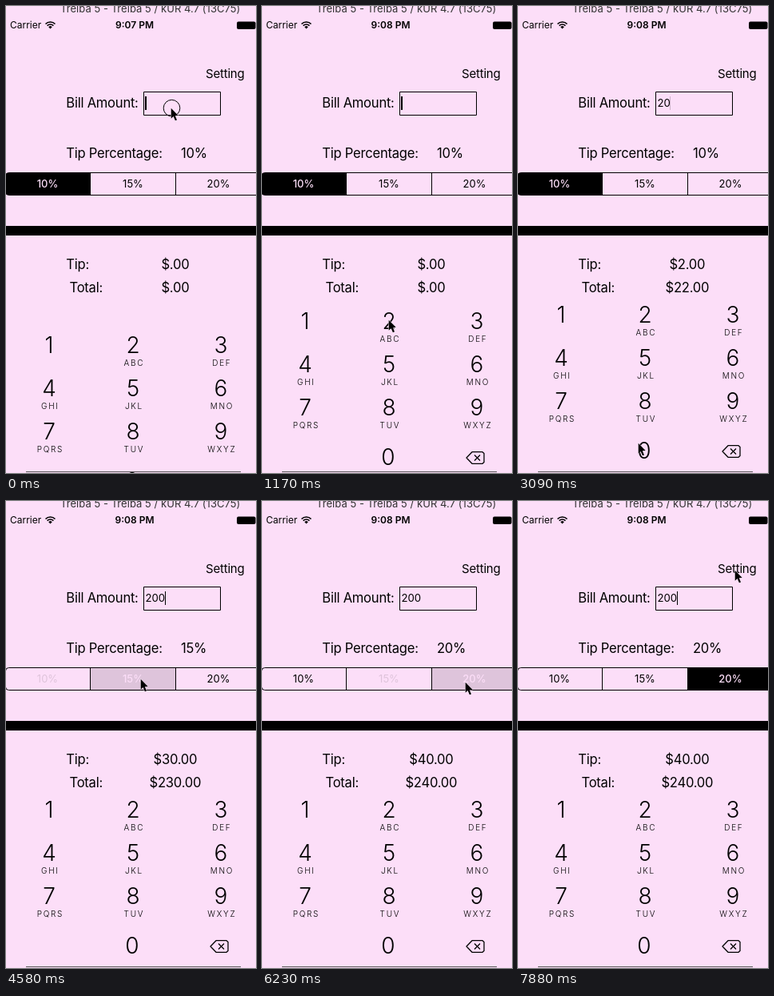
These frames come from a looping animation (313 px wide and 584 px high, 8 s). An HTML page with a canvas:

```html
<!DOCTYPE html>
<html lang="en">
<head>
<meta charset="utf-8">
<title>Tip calculator</title>
<style>
html, body { margin: 0; width: 100%; height: 100%; overflow: hidden; background: #fcdef8; }
canvas { display: block; width: 313px; height: 584px; }
</style>
</head>
<body>
<canvas id="stage"></canvas>
<script>
const W = 313, H = 584, LOOP = 8000;
const BG = '#fcdef8', INK = '#000';
const canvas = document.getElementById('stage');
const ctx = canvas.getContext('2d');
const dpr = window.devicePixelRatio || 1;
canvas.width = W * dpr;
canvas.height = H * dpr;

const clamp = v => Math.max(0, Math.min(1, v));

// Pointer tip: time, x, y
const path = [
  [0, 206, 127], [150, 206, 127], [590, 177, 306], [1030, 158, 392], [1320, 156, 397],
  [2360, 156, 397], [2650, 150, 546], [3230, 150, 546], [3530, 166, 238], [3680, 166, 238],
  [4130, 168, 222], [4580, 168, 222], [5180, 241, 237], [5330, 241, 237], [5780, 255, 226],
  [5930, 254, 226], [6980, 254, 226], [7580, 269, 76], [7880, 271, 86]
];
const clicks = [0, 1470, 2650, 3230, 4430, 6080];
const bills = [[0, ''], [1470, '2'], [2650, '20'], [3230, '200']];
const tips = [[0, 0], [4430, 1], [6080, 2]];
const rates = [10, 15, 20];
const keys = ['', 'ABC', 'DEF', 'GHI', 'JKL', 'MNO', 'PQRS', 'TUV', 'WXYZ'];
const columns = [54, 159, 269];

function snap(t) {
  return t < 3530
    ? Math.floor(t / 147) * 147.1
    : 3530 + Math.floor((Math.min(t, 7880) - 3530) / 150) * 150;
}

const latest = (list, t) => list.filter(e => e[0] <= t + 8).pop();

function pointerAt(t) {
  const i = path.findIndex(p => p[0] > t);
  if (i < 0) return path[path.length - 1].slice(1);
  const [t0, x0, y0] = path[i - 1], [t1, x1, y1] = path[i];
  const k = (t - t0) / (t1 - t0);
  return [x0 + (x1 - x0) * k, y0 + (y1 - y0) * k];
}

function text(str, x, y, size, { weight = 400, align = 'left', color = INK, spacing = 0, alpha = 1 } = {}) {
  ctx.font = `${weight} ${size}px Inter, "Open Sans", sans-serif`;
  ctx.letterSpacing = spacing + 'px';
  ctx.textAlign = align;
  ctx.fillStyle = color;
  ctx.globalAlpha = alpha;
  ctx.fillText(str, align === 'center' ? x + spacing / 2 : x, y);
  ctx.globalAlpha = 1;
}

const label = (str, x, y, align) => text(str, x, y, 16.6, { spacing: -0.25, align });
const money = v => '$' + v.toFixed(2).replace(/^0/, '');

function stroke(width, color = INK) {
  ctx.lineWidth = width;
  ctx.strokeStyle = color;
  ctx.stroke();
}

function polygon(points) {
  ctx.beginPath();
  points.forEach(([x, y]) => ctx.lineTo(x, y));
  ctx.closePath();
}

function statusBar(t) {
  text('Trelba 5 - Trelba 5 / kUR 4.7 (13C75)', 68, 8, 13, { color: '#333', spacing: 0.05 });
  text('Carrier', 5, 28, 12);
  text(t < 290 ? '9:07 PM' : '9:08 PM', 161, 28, 12, { weight: 600, align: 'center' });
  for (const r of [8.5, 5.5]) {
    ctx.beginPath();
    ctx.arc(55.5, 28.5, r, -Math.PI * 0.75, -Math.PI * 0.25);
    stroke(1.7);
  }
  ctx.beginPath();
  ctx.moveTo(55.5, 28.5);
  ctx.arc(55.5, 28.5, 3.2, -Math.PI * 0.75, -Math.PI * 0.25);
  ctx.fillStyle = INK;
  ctx.fill();
  ctx.beginPath();
  ctx.roundRect(289, 19.5, 23.5, 9.5, 2);
  ctx.fill();
}

function segments(index, start, t) {
  const edges = [-0.5, 105.5, 212.5, 320.5];
  const fade = index ? clamp((t - start) * 0.00078) : 1;
  ctx.save();
  ctx.beginPath();
  ctx.roundRect(-0.5, 208.5, 321, 28, 4);
  ctx.save();
  ctx.clip();
  ctx.globalAlpha = fade;
  ctx.fillStyle = INK;
  ctx.fillRect(edges[index], 208, edges[index + 1] - edges[index], 29);
  ctx.restore();
  stroke(1);
  ctx.restore();
  for (const x of edges.slice(1, 3)) {
    ctx.fillStyle = INK;
    ctx.fillRect(x - 0.5, 208, 1, 29);
  }
  rates.forEach((rate, i) => text(rate + '%', [52, 159, 266][i], 227, 13, {
    align: 'center',
    weight: i === index ? 500 : 400,
    color: i === index ? BG : INK,
    alpha: i === index - 1 ? fade : 1
  }));
}

function keypad(t) {
  const dy = Math.round(38 * Math.exp(-t / 660));
  ctx.save();
  ctx.translate(0, dy);
  const digit = (d, x, y) => text(d, x, y, 28, { weight: 300, align: 'center' });
  keys.forEach((letters, i) => {
    const x = columns[i % 3], y = 396 + 54 * Math.floor(i / 3);
    digit(i + 1, x, y);
    text(letters, x + 0.5, y + 15.5, 10, { weight: 300, align: 'center', spacing: 1.7 });
  });
  digit(0, 158, 566);

  ctx.translate(255, 549);
  ctx.lineJoin = 'round';
  polygon([[1, 8], [8, 0.7], [21, 0.7], [23, 2.5], [23, 13.5], [21, 15.3], [8, 15.3]]);
  stroke(1.3);
  ctx.beginPath();
  ctx.moveTo(11, 4.5); ctx.lineTo(18, 11.5);
  ctx.moveTo(18, 4.5); ctx.lineTo(11, 11.5);
  stroke(1.3);
  ctx.restore();
  ctx.fillStyle = '#555';
  ctx.fillRect(25, 582, 269, 1);
}

function pointer(t) {
  const [x, y] = pointerAt(t);
  ctx.save();
  ctx.translate(x + 0.7, y + 0.7);
  if (clicks.some(c => t >= c - 8 && t < c + 135)) {
    ctx.beginPath();
    ctx.arc(0.8, 0, 10.3, 0, Math.PI * 2);
    stroke(1);
  }
  polygon([[0, 0], [0, 13], [2.9, 10.3], [5.2, 15.6], [7.3, 14.7], [5.1, 9.5], [9, 9.2]]);
  stroke(1, 'rgba(255,240,253,.8)');
  ctx.fillStyle = INK;
  ctx.fill();
  ctx.restore();
}

function draw(time) {
  const t = snap(time);
  const bill = latest(bills, t)[1];
  const [start, index] = latest(tips, t);
  const tip = bill * rates[index] / 100;

  ctx.setTransform(dpr, 0, 0, dpr, 0, 0);
  ctx.fillStyle = BG;
  ctx.fillRect(0, 0, W, H);

  statusBar(t);
  text('Setting', 250, 90, 15, { spacing: -0.2 });
  label('Bill Amount:', 75.3, 127);
  ctx.beginPath();
  ctx.rect(172.5, 107.5, 96, 29);
  stroke(1);
  text(bill, 174.5, 126, 13.2);
  const caretX = bill ? 174 + ctx.measureText(bill).width : 174;
  ctx.globalAlpha = clamp(0.5 + 3 * Math.cos(t / 1130 * Math.PI * 2));
  ctx.fillStyle = INK;
  ctx.fillRect(Math.round(caretX), 113, bill ? 1 : 2, 17);
  ctx.globalAlpha = 1;

  label('Tip Percentage:', 75.3, 190);
  label(rates[index] + '%', 219, 190);
  segments(index, start, t);
  ctx.fillStyle = INK;
  ctx.fillRect(0, 275, W, 12);

  label('Tip:', 75.3, 329);
  label('Total:', 79.5, 358);
  label(money(tip), 212, 329, 'center');
  label(money(+bill + tip), 212, 358, 'center');
  keypad(t);
  pointer(t);
}

const begin = performance.now();
function tick() {
  draw((performance.now() - begin) % LOOP);
  requestAnimationFrame(tick);
}
tick();
</script>
</body>
</html>
```
